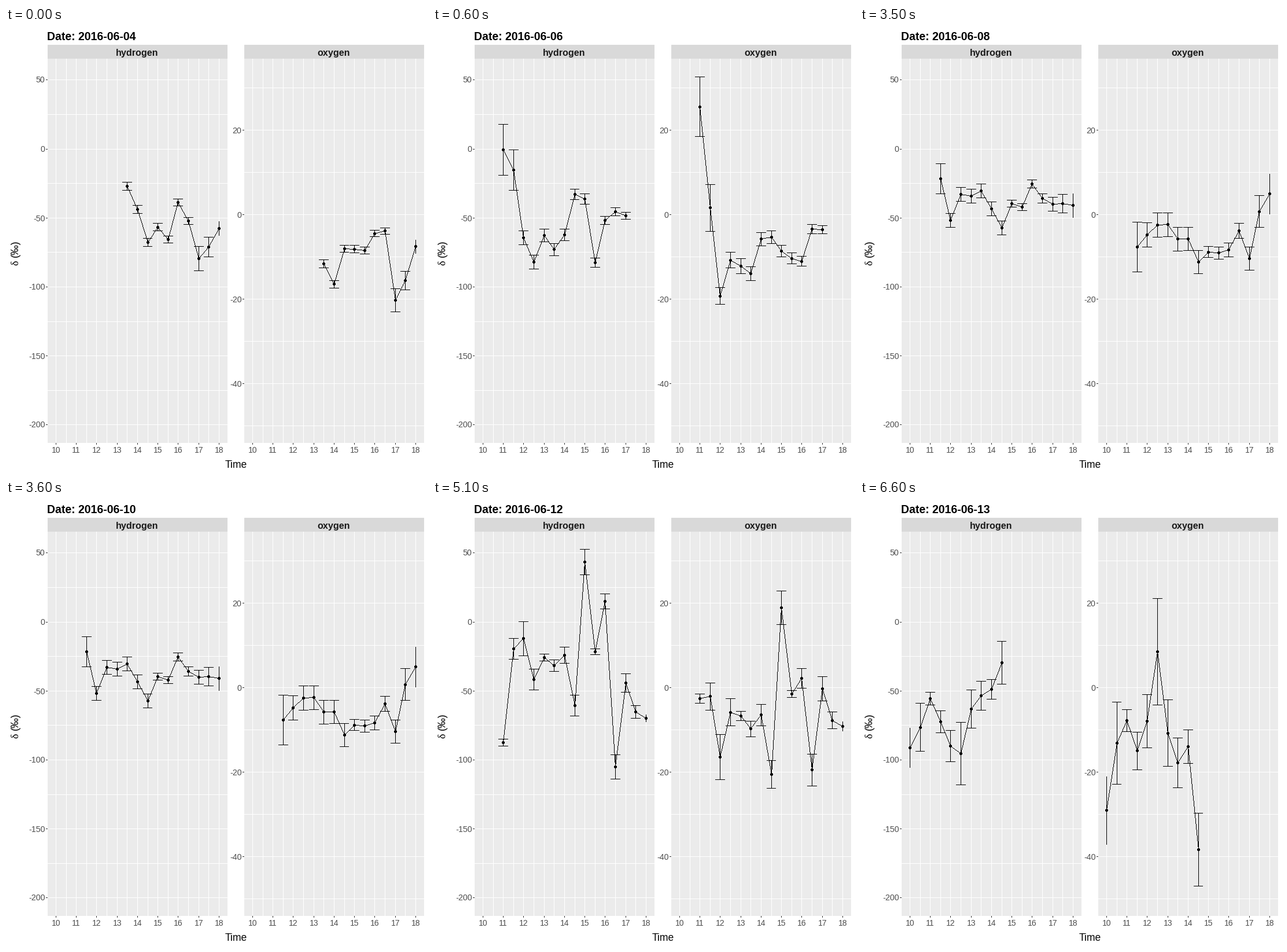
A matplotlib script for the animation above (8000 ms loop, 728 by 769 pixels).

```python
from math import floor

import matplotlib.pyplot as plt
import numpy as np
from matplotlib.animation import FuncAnimation
from matplotlib.collections import LineCollection
from matplotlib.patches import Rectangle

W, H, DPI = 728, 769, 128
PX = 72 / DPI                # one pixel in points
STEP = 35.25                 # pixels per hour
TOP, BOTTOM = 53, 717        # panel edges
CAP = 7.93                   # half width of an error bar cap
HOLD, SHIFT = 15, 10         # frames per day, frames already elapsed

fig = plt.figure(figsize=(W / DPI, H / DPI), dpi=DPI, facecolor="white")
ax = fig.add_axes([0, 0, 1, 1])
ax.set(xlim=(0, W), ylim=(H, 0))
ax.axis("off")


def label(x, y, s, size, color="black", font="Liberation Sans", **kw):
    return ax.text(x, y, s, fontsize=size * PX, color=color, family=font,
                   va="baseline", **kw)


def box(x0, y0, x1, y1, color):
    ax.add_patch(Rectangle((x0, y0), x1 - x0, y1 - y0, fc=color, lw=0,
                           antialiased=False, snap=False))


def strokes(color, segments=(), z=2):
    art = LineCollection(segments, colors=color, linewidths=0.9 * PX,
                         antialiaseds=False, capstyle="butt", zorder=z)
    art.set_snap(False)
    return ax.add_collection(art, autolim=False)


def across(x0, x1, y):
    return [(x0, y + 0.5), (x1, y + 0.5)]


def down(x, y0, y1):
    return [(x + 0.5, y0), (x + 0.5, y1)]


def slope(p, q):
    """One-pixel steps from p to q, without smoothing."""
    n = max(abs(q[0] - p[0]), abs(q[1] - p[1])) + 1
    xs, ys = (np.rint(np.linspace(a, b, n)) for a, b in zip(p, q))
    return [across(x, x + 1, y) for x, y in zip(xs, ys)]


def dot(x, y):
    reach = {dy: 1 if abs(dy) == 2 else 2 for dy in range(-2, 3)}
    return [across(x - r, x + r + 1, y + dy) for dy, r in reach.items()]


class Panel:
    """A facet with its grid, axes and one line with error bars."""

    def __init__(self, name, left, x10, zero, unit, majors, minors):
        self.x10, self.zero, self.unit = x10, zero, unit
        right = left + 311
        box(left, 29, right, TOP, "#D9D9D9")
        box(left, TOP, right, BOTTOM, "#EBEBEB")
        label(left + 155, 48, name, 16.1, "#1A1A1A", weight="bold",
              ha="center")

        grid, ticks = [], []
        for half in range(17):
            x = floor(self.x_at(10 + half / 2))
            grid.append(down(x, TOP, BOTTOM))
            if half % 2 == 0:
                ticks.append(down(x, BOTTOM, BOTTOM + 3))
                label(x + 0.5, 733.5, str(10 + half // 2), 14, "#4D4D4D",
                      ha="center")
        for v in [*majors, *minors]:
            y = self.y_at(v)
            grid.append(across(left, right, y))
            if v in majors:
                ticks.append(across(left - 3, left, y))
                label(left - 4.5, y + 5.5, str(v), 14.2, "#4D4D4D",
                      ha="right")
        strokes("white", grid)
        strokes("#333333", ticks)
        self.ink = strokes("black", z=3)

    def x_at(self, hour):
        return self.x10 + (hour - 10) * STEP

    def y_at(self, v):
        return floor(self.zero - v * self.unit)

    def show(self, hours, means, errors):
        segs, path = [], []
        for hour, mean, err in zip(hours, means, errors):
            x = self.x_at(hour)
            hi, lo = self.y_at(mean + err), self.y_at(mean - err)
            path.append((floor(x), self.y_at(mean)))
            segs.append(down(floor(x), hi, lo + 1))
            if 10 < hour < 18:      # caps beyond the limits are dropped
                segs += [across(floor(x - CAP), floor(x + CAP) + 1, y)
                         for y in (hi, lo)]
            segs += dot(*path[-1])
        for p, q in zip(path, path[1:]):
            segs += slope(p, q)
        self.ink.set_segments(segs)


days = []


def day(date, start, spread, ratio, hydrogen, oxygen):
    """Half-hourly means; hydrogen's error runs through the (hour, size)
    points of spread, and oxygen's is ratio times as large."""
    hours = start + np.arange(len(hydrogen)) / 2
    errors = np.interp(hours, *zip(*spread))
    days.append((date, hours, (hydrogen, errors), (oxygen, ratio * errors)))


day("2016-06-04", 13.5, [(13.5, 3), (16.5, 2.5), (17, 9), (18, 5)], 0.31,
    [-27.1, -43.8, -67.7, -56.8, -65.6, -38.8, -52.2, -79.5, -71.1, -57.7],
    [-11.7, -16.5, -8.1, -8.2, -8.5, -4.5, -3.9, -20.3, -15.6, -7.6])
day("2016-06-06", 11, [(11, 18.6), (11.5, 14.6), (12, 5.2), (17, 2.6)], 0.38,
    [-0.6, -15.3, -64.4, -82, -62.7, -72.8, -62.3, -32.9, -36.3, -82.4,
     -51.8, -45.5, -48.4],
    [25.5, 1.6, -19.3, -10.8, -12.2, -14, -5.8, -5.4, -8.7, -10.4, -11.1,
     -3.5, -3.6])
day("2016-06-08", 10.5, [(10.5, 4.2), (11.5, 4.6), (12.5, 2.5), (17, 3)], 0.38,
    [-73.2, -1, -35.4, -34.6, -43, -32.1, -35.4, -35.4, -43, -39.6, -44.3,
     -32.1, -47.6, -32.5],
    [-14, -15, -10.7, -3.5, -5.6, -3.9, -1.5, -5.6, -6.3, -8.8, -8.7, -4.8,
     -3.9, -4.1])
day("2016-06-10", 11.5,
    [(11.5, 10.8), (12, 5.2), (14.5, 5), (15, 2.4), (16.5, 3.2), (18, 8.6)],
    0.55,
    [-21.6, -51.8, -32.9, -34.2, -30.4, -43.4, -57.3, -39.6, -42.2, -25.4,
     -35.9, -40.1, -39.6, -40.9],
    [-7.7, -4.8, -2.5, -2.4, -5.8, -5.8, -11.3, -8.9, -9.1, -8.4, -3.9,
     -10.4, 0.7, 4.9])
day("2016-06-12", 11,
    [(11, 2.5), (12, 12.4), (13, 2.5), (15, 9.3), (15.5, 1.9), (16.5, 8.8),
     (18, 2.5)], 0.43,
    [-87.5, -19.5, -12, -41.7, -25.8, -31.7, -24.1, -60.6, 43.4, -21.6, 14.9,
     -105.1, -44.3, -65.2, -69.8],
    [-2.6, -2.1, -16.5, -5.9, -6.7, -9.8, -6.5, -20.6, 18.9, -1.5, 2.2,
     -19.5, -0.3, -7.8, -9.2])
day("2016-06-13", 10,
    [(10, 14.3), (10.5, 17.4), (11, 4.7), (12, 11.3), (12.5, 22.5), (13, 14),
     (14, 7), (14.5, 15.5)], 0.56,
    [-91.2, -76.5, -55.6, -72.4, -90, -95.4, -63.1, -53.5, -48.9, -29.6],
    [-29.1, -13.2, -7.8, -15, -8, 8.5, -10.8, -17.8, -14, -38.4])

panels = [
    Panel("hydrogen", 72, 86.4, 209, 2.384,
          range(-200, 51, 50), range(-175, 26, 50)),
    Panel("oxygen", 412, 426.4, 322.3, 7.3,
          range(-40, 21, 20), range(-50, 31, 20)),
]
title = label(71, 21, "", 19.5, weight="bold", ha="left")
label(397.3, 760, "Time", 17.5, ha="center")
upright = dict(rotation=90, rotation_mode="anchor", ha="left")
label(21, 410.5, "δ", 18, font="Liberation Serif", **upright)
label(21, 396, "(‰)", 17.6, **upright)


def update(i):
    _, hours, *series = days[(i + SHIFT) // HOLD]
    for panel, (means, errors) in zip(panels, series):
        panel.show(hours, means, errors)
    # the date follows the data one frame later
    title.set_text("Date: " + days[(i + SHIFT - 1) // HOLD][0])
    return []


anim = FuncAnimation(fig, update, frames=80, interval=100, repeat=True,
                     repeat_delay=0, init_func=lambda: update(0))
plt.show()
```
